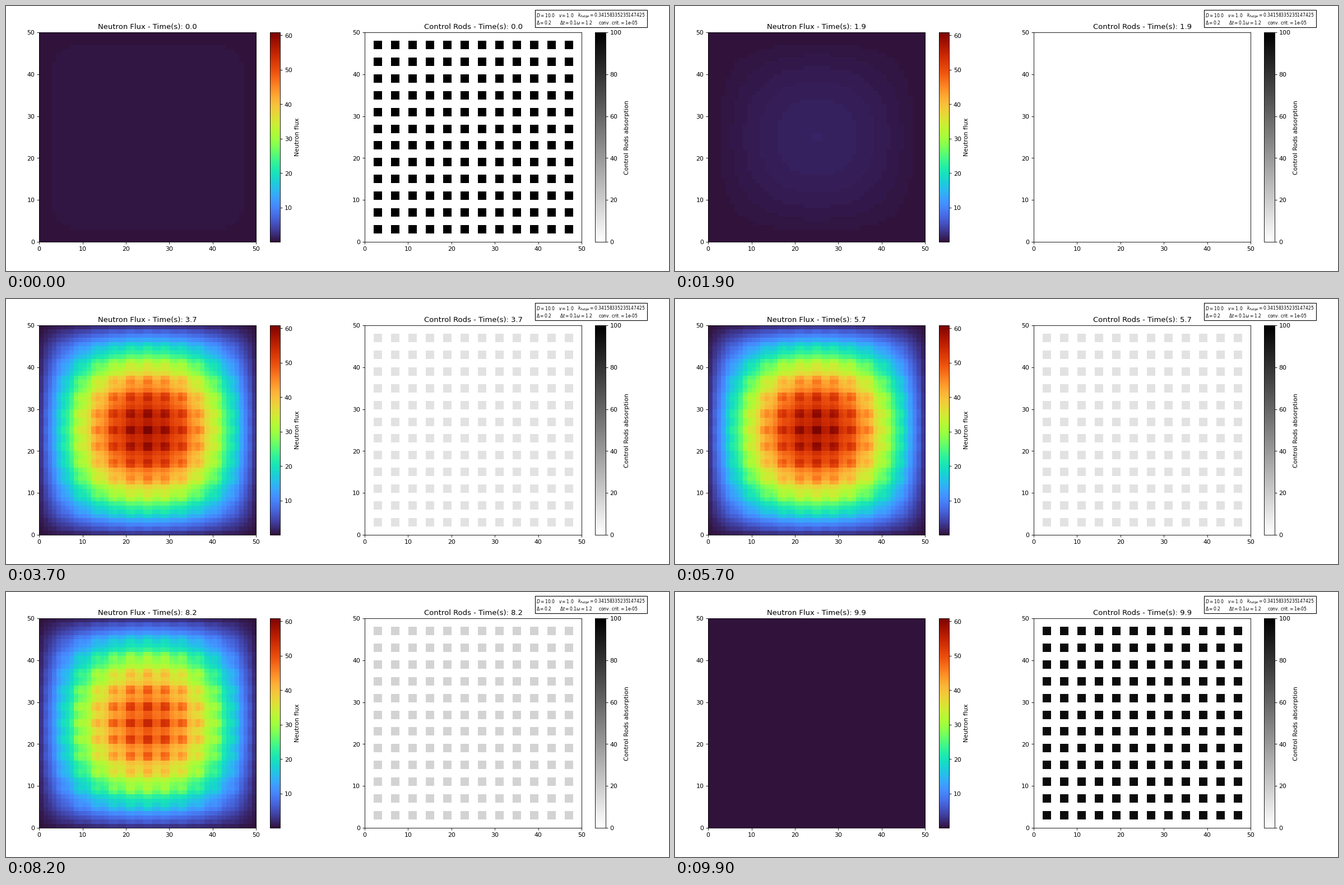
A matplotlib script that plays this animation: 1183x473 px, repeating every 10 s.

```python
import numpy as np
import matplotlib.pyplot as plt
from matplotlib.animation import FuncAnimation
from matplotlib.patches import Rectangle

W, H = 1183, 473
N, FRAMES, DT = 50, 100, 0.1
VMIN, VMAX = 0.05, 60.86
R_CRIT = 11.4

plt.rcParams["font.family"] = "DejaVu Sans"

cells = np.arange(N)
fundamental = np.sin(np.pi * (cells + 1) / (N + 1))
fundamental /= fundamental.max()
edge = np.minimum(cells, N - 1 - cells) + 1
start_profile = 1 - np.exp(-edge / 3.7)
gap = np.where(cells % 4 < 2, 1, -1)
rod_mask = np.outer(gap < 0, gap < 0)
ripple = 0.226 * (gap[:, None] + gap) + 0.1 * np.outer(gap, gap) - 0.552


def build_history():
    """Peak flux and rod absorption for every time step."""
    peaks, rods = [], []
    peak = 0
    for n in range(FRAMES):
        t = n * DT
        if n <= 81:
            drift = np.clip((t - 5.6) / 2.5, 0, 1)
            peak = VMAX / (1 + np.exp(-5.957 * (t - 2.52))) - 0.56 * drift
            rod = 100 * (1 - t) if t < 1 else R_CRIT * peak / VMAX + 1.3 * drift
        else:
            rod = 12.6 + 46 * (t - 8.1)
            peak /= 1 + 0.02 * (rod - 12)
        peaks.append(peak)
        rods.append(rod)
    return peaks, rods


peaks, rods = build_history()


def flux(n):
    if n == 0:
        return 0.5 * np.outer(start_profile, start_profile)
    depth = 0.3 * (1 - np.exp(-rods[n] / 25))
    return peaks[n] * np.outer(fundamental, fundamental) * (1 + depth * ripple)


def panel(ax, cmap, vmin, vmax, label):
    img = ax.imshow(np.zeros((N, N)), cmap=cmap, vmin=vmin, vmax=vmax,
                    origin="lower", extent=(0, N, 0, N), aspect="auto",
                    interpolation="nearest")
    fig.colorbar(img, ax=ax, label=label)
    return img


def note(x, y, text):
    fig.text(x / W, 1 - y / H, text, fontsize=7, va="baseline", zorder=3)


fig, (ax_flux, ax_rods) = plt.subplots(1, 2, figsize=(15, 6), dpi=78.87)
fig.subplots_adjust(left=0.05, right=0.95, bottom=0.11, top=0.9)
flux_img = panel(ax_flux, "turbo", VMIN, VMAX, "Neutron flux")
rod_img = panel(ax_rods, "binary", 0, 100, "Control Rods absorption")

# parameter box
fig.add_artist(Rectangle((943.5 / W, 1 - 38.2 / H), 200 / W, 30.6 / H,
                         transform=fig.transFigure, fc="white", ec="black",
                         lw=1, zorder=2))
note(946, 19.5, r"$D=10.0$")
note(986.4, 19.5, r"$v=1.0$")
note(1019.5, 19.5, r"$k_{fudge}=0.34158335235147425$")
note(946, 33, r"$\Delta=0.2$")
note(987.6, 33, r"$\Delta t=0.1\omega=1.2$")
note(1056.8, 33, r"conv. crit.$=$1e-05")


def update(n):
    flux_img.set_data(flux(n))
    rod_img.set_data(rods[n] * rod_mask)
    ax_flux.set_title(f"Neutron Flux - Time(s): {n * DT:.1f}")
    ax_rods.set_title(f"Control Rods - Time(s): {n * DT:.1f}")
    return flux_img, rod_img


anim = FuncAnimation(fig, update, frames=FRAMES, interval=100,
                     repeat=True, repeat_delay=0)
plt.show()
```
